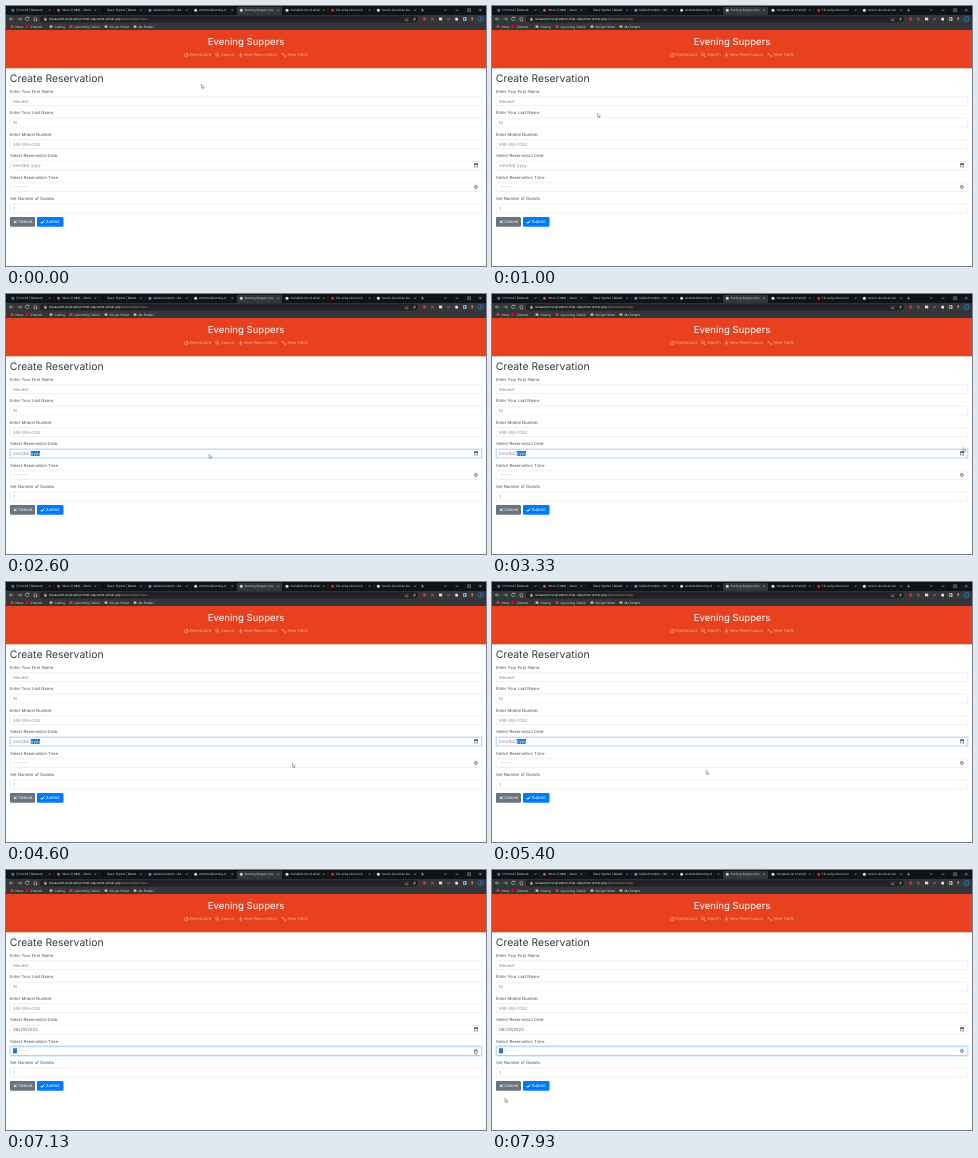
Recreate the animation shown at these times as an HTML page. Size 480 by 260 pixels, loop 8000 ms.

```html
<!DOCTYPE html>
<html lang="en">
<head>
<meta charset="utf-8">
<title>Create Reservation</title>
<style>
html, body { margin: 0; width: 100%; height: 100%; overflow: hidden; background: #fff; }
svg { display: block; width: 480px; height: 260px; font-family: Inter, "Open Sans", sans-serif; text-rendering: geometricPrecision; }
</style>
</head>
<body>
<svg id="stage" viewBox="0 0 480 260"></svg>
<script>
const stage = document.getElementById('stage');

function add(tag, attrs, content = '') {
  const el = document.createElementNS('http://www.w3.org/2000/svg', tag);
  for (const key in attrs) el.setAttribute(key, attrs[key]);
  el.textContent = content;
  return stage.appendChild(el);
}
const box = (x, y, width, height, fill, more) => add('rect', { x, y, width, height, fill, ...more });
const dot = (cx, cy, r, fill, more) => add('circle', { cx, cy, r, fill, ...more });
const text = (x, y, size, fill, str, more) => add('text', { x, y, 'font-size': size, fill, ...more }, str);
const line = (d, stroke, width = 0.6, more) => add('path', { d, stroke, 'stroke-width': width, fill: 'none', ...more });

// Tab strip
box(0, 0, 480, 9, '#101418');
box(231, 1, 45, 8, '#343639', { rx: 1.5 });
const tabs = [
  ['(1) Home | Network', '#2f7fc4'], ['Inbox (2,086) - wend', '#d94b3d'], ['Basic Syntax | Markd', '#111'],
  ['tableofcontents - Ba', '#4a90d9'], ['wrenfold/Evening-S', '#ddd'], ['Evening Suppers Res', '#c9d3dc'],
  ['Complete list of emoji', '#ddd'], ['(3) using emoji in m', '#e02020'], ['how to record an exc', '#eee']
];
tabs.forEach(([name, color], i) => {
  const x = 6.8 + i * 45.7;
  dot(x, 4.2, 1.5, color);
  text(x + 3.4, 5.2, 2.9, '#d5d7da', name);
  line(`M${x + 36} 3.4l1.6 1.6m0-1.6l-1.6 1.6`, '#bbb', 0.4);
  if (i < 8 && i !== 4 && i !== 5) line(`M${x + 41} 2.5v4`, '#555', 0.3);
});
line('M415 4.2h3m-1.5-1.5v3M438 3.5l1.2 1.2 1.2-1.2M449.5 4.2h3M461.8 2.8h2.6v2.6h-2.6zM473 2.8l2.6 2.6m0-2.6l-2.6 2.6', '#ddd', 0.45);

// Toolbar and bookmarks
box(0, 9, 480, 15, '#343639');
box(34, 9.8, 378, 6.6, '#202124', { rx: 3.3 });
line('M7.5 13h-4m1.6-1.6L3.5 13l1.6 1.6M11.5 13h4m-1.6-1.6l1.6 1.6-1.6 1.6M22.8 11.8a1.8 1.8 0 1 0 .2 1.8M22.9 10.9v1.2h-1.2M27.5 13l1.9-1.8 1.9 1.8M28.2 12.6v2.2h2.4v-2.2', '#ddd', 0.5);
box(38.2, 12.6, 2.4, 2, '#bbb');
line('M38.8 12.6v-.7a.6.6 0 0 1 1.2 0v.7', '#bbb', 0.4);
const url = text(43, 14.1, 3.1, '#eee', 'restaurant-reservation-final-capstone.vercel.app');
const rest = document.createElementNS(url.namespaceURI, 'tspan');
rest.setAttribute('fill', '#92969b');
rest.textContent = '/reservations/new';
url.appendChild(rest);
line('M399.5 12.6v2h2.6v-1M400.6 13.4l1.8-1.8M407 13h3m-1.5-1.5v3', '#ccc', 0.45);
box(417.2, 11.5, 2.6, 3, '#d93030');
dot(426.4, 13, 1.5, '#a04a34');
box(433, 11.6, 3.2, 2.8, '#ddd');
line('M441 13l1 1.1 1.8-2.2', '#8ea2b5', 0.6);
box(449.4, 11.8, 2.6, 2.6, '#eee', { rx: 0.5 });
line('M457.4 11.6h2.8v2.8h-2.8zM459.4 11.6v2.8', '#eee', 0.6);
dot(466.2, 12.2, 0.9, '#c69b78');
box(465.2, 13.1, 2, 1.7, '#b04a44');
dot(474.5, 13, 2.6, '#26333d', { stroke: '#2686c9', 'stroke-width': 0.8 });
text(474.5, 14.1, 3, '#fff', 'I', { 'text-anchor': 'middle' });
[[6, 'Inbox', '#e0443a'], [21, 'Vidnook', '#f00'], [45, 'Coding', '#e8c15b'], [65, 'Upcoming Tuition', '#e0443a'],
 [100, 'Recipe Finder', '#e8c15b'], [129, 'My Folders', '#e8c15b']].forEach(([x, name, color]) => {
  box(x - 1.4, 19.4, 2.8, 2.4, color, { rx: 0.4 });
  text(x + 3.6, 21.8, 3, '#e4e4e4', name);
});

// Page header
box(0, 24, 480, 38.3, '#e8411f');
text(240, 38.5, 9.6, '#fff', 'Evening Suppers', { 'text-anchor': 'middle' });
const pale = '#f5a994';
[[184, 'Dashboard'], [215, 'Search'], [238, 'New Reservation'], [281.5, 'New Table']].forEach(([x, name]) =>
  text(x, 50.4, 4.15, pale, name));
dot(180.3, 49, 1.9, 'none', { stroke: pale, 'stroke-width': 0.7 });
dot(211, 48.5, 1.4, 'none', { stroke: pale, 'stroke-width': 0.7 });
line('M180.3 49.5l.9-1.4M212 49.6l1.3 1.4M232.6 49h3.8m-1.9-1.9v3.8M276.3 47.6l3.6 3.2M276 48.7l1.6-1.6M278.7 51.2l1.6-1.6', pale, 0.8);

// Form
const ink = '#343a40', gray = '#858b91', blue = '#1673d2';
text(3.8, 76, 10.4, ink, 'Create Reservation');
const fields = ['Enter Your First Name:', 'Enter Your Last Name:', 'Enter Mobile Number:',
  'Select Reservation Date:', 'Select Reservation Time:', 'Set Number of Guests:'];
const values = ['Wendell', 'M', '555-555-0142', '', '', '1'];
const inputs = fields.map((name, i) => {
  const y = 21.5 * i;
  text(4, 86.6 + y, 4.2, '#4a5056', name);
  const input = box(4.2, 90.7 + y, 471.6, 8.8, '#fff', { rx: 1 });
  text(7, 96.7 + y, 4.1, gray, values[i]);
  return input;
});
const dateMark = box(25, 157, 9.2, 5, blue);
const dateText = text(7, 161, 4.5, gray, '');
const yearText = text(25, 161, 4.3, gray, '');
const timeMark = box(7, 178.3, 4, 5, blue);
text(7.4, 182.3, 4, '#9a9fa5', '--:-- --');
box(468.6, 158, 3.2, 3, '#fff', { stroke: '#333', 'stroke-width': 0.4 });
box(468.4, 157.6, 3.6, 1.1, '#222');
dot(469.8, 181, 1.6, '#fff', { stroke: '#222', 'stroke-width': 0.5 });
line('M469.8 180v1.1h.9', '#222', 0.4);

// Buttons
box(4, 211, 25, 9.7, '#6c757d', { rx: 1 });
box(31, 211, 26.5, 9.7, '#007bff', { rx: 1 });
line('M8 214.6l2.6 2.6m0-2.6l-2.6 2.6', '#fff', 1);
line('M34.6 216l1.2 1.3 2.5-2.7', '#fff', 1);
[[12.3, 'Cancel'], [39.8, 'Submit']].forEach(([x, name]) =>
  text(x, 217.4, 4.2, '#fff', name));

const cursor = add('path', {
  d: 'M0 0V4.1l.9-.8.8 1.6.7-.4-.8-1.5h1.3z', fill: '#fff', stroke: '#444', 'stroke-width': 0.4
});

// Pointer stops: time, x, y
const stops = [
  [0, 195.5, 78], [70, 195.5, 78], [250, 278, 32], [600, 7, 217], [870, 110, 104], [1730, 41, 154],
  [2000, 30, 158.5], [2200, 30, 158.5], [2600, 203, 160], [3330, 471, 153.5], [3470, 473, 161],
  [4070, 470, 162], [4400, 468, 163], [4600, 286.5, 181], [5000, 21, 217], [5200, 30, 210],
  [5650, 468, 158], [6070, 330, 174], [6200, 219, 184], [6450, 42, 199], [6930, 471, 182],
  [7000, 468.7, 180], [7270, 468.7, 180], [7700, 4, 234], [7930, 13, 228], [8000, 13, 228]
];

function pointer(t) {
  const i = stops.findIndex(s => s[0] > t);
  const [t0, x0, y0] = stops[i - 1], [t1, x1, y1] = stops[i];
  const p = (t - t0) / (t1 - t0), k = p * p * (3 - 2 * p);
  return [x0 + (x1 - x0) * k, y0 + (y1 - y0) * k];
}

function draw(now) {
  const t = now % 8000;
  const onDate = t >= 2130 && t < 7000, onTime = t >= 7000, picked = t >= 5700;
  inputs.forEach((input, i) => {
    const active = i === 3 && onDate || i === 4 && onTime;
    input.setAttribute('stroke', active ? '#80bdff' : '#d8dde2');
    input.setAttribute('stroke-width', active ? 0.7 : 0.45);
    input.style.outline = active ? '0.8px solid #e0efff' : 'none';
  });
  const yearX = picked ? 21.2 : 25, dateInk = picked ? '#5c636a' : gray;
  dateText.textContent = picked ? '06/29/' : 'mm/dd/';
  yearText.textContent = picked ? '2022' : 'yyyy';
  yearText.setAttribute('x', yearX);
  dateText.setAttribute('fill', dateInk);
  yearText.setAttribute('fill', onDate ? '#fff' : dateInk);
  dateMark.setAttribute('x', yearX - 0.2);
  dateMark.setAttribute('width', picked ? 10 : 9.2);
  dateMark.setAttribute('visibility', onDate ? 'visible' : 'hidden');
  timeMark.setAttribute('visibility', onTime ? 'visible' : 'hidden');
  cursor.setAttribute('transform', `translate(${pointer(t)})`);
  requestAnimationFrame(() => draw(performance.now() - start));
}
const start = performance.now();
draw(0);
</script>
</body>
</html>
```
